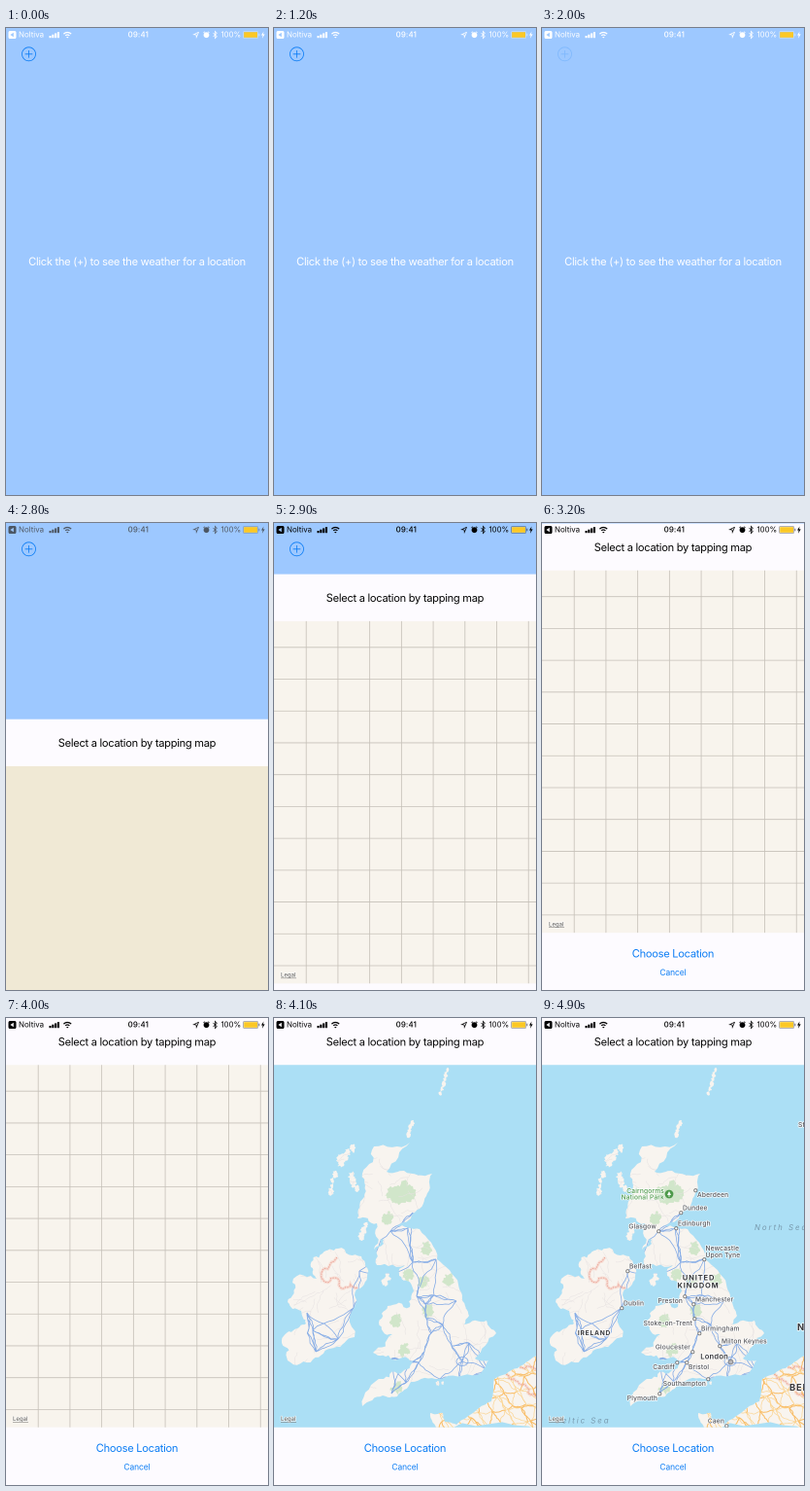
An HTML page with a canvas for the animation above (5 s loop, 270x480 px).

```html
<!DOCTYPE html>
<html lang="en">
<head>
<meta charset="utf-8">
<title>Weather location picker</title>
<style>
  html, body { margin: 0; width: 100%; height: 100%; overflow: hidden; background: #9dc8ff; }
  canvas { display: block; width: 270px; height: 480px; }
</style>
</head>
<body>
<canvas id="stage"></canvas>
<script>
const W = 270, H = 480, LOOP = 5000;
const MAP_TOP = 48.3, MAP_BOTTOM = 420.7;
const SKY = '#9dc8ff', PANEL = '#fdfbff', BLUE = '#0a7cf5';
const FONT = 'Inter, Roboto, sans-serif';
const scale = Math.max(2, window.devicePixelRatio || 1);

function makeLayer(canvas = document.createElement('canvas')) {
  canvas.width = W * scale;
  canvas.height = H * scale;
  const c = canvas.getContext('2d');
  c.scale(scale, scale);
  return c;
}

const ramp = (t, from, to) => Math.max(0, Math.min(1, (t - from) / (to - from)));

function random(seed) {
  seed = (seed * 48271 * 997) % 2147483647;
  return () => {
    seed = (seed * 16807) % 2147483647;
    return seed / 2147483647;
  };
}

function text(c, str, x, y, size, color, o = {}) {
  c.font = `${o.style || ''} ${o.weight || 400} ${size}px ${FONT}`;
  c.letterSpacing = (o.spacing || 0) + 'px';
  c.textAlign = o.align || 'center';
  c.textBaseline = 'middle';
  if (o.halo) {
    c.strokeStyle = o.halo;
    c.lineWidth = 1.6;
    c.lineJoin = 'round';
    c.strokeText(str, x, y);
  }
  c.fillStyle = color;
  c.fillText(str, x, y);
}

function disc(c, x, y, r, fill, stroke) {
  c.beginPath();
  c.arc(x, y, r, 0, 7);
  c.fillStyle = fill;
  c.fill();
  if (!stroke) return;
  c.strokeStyle = stroke;
  c.lineWidth = 0.8;
  c.stroke();
}

function points(flat) {
  const out = [];
  for (let i = 0; i < flat.length; i += 2) out.push([flat[i], flat[i + 1]]);
  return out;
}

function toPath(list) {
  const p = new Path2D();
  list.forEach(([x, y]) => p.lineTo(x, y));
  return p;
}

// Midpoint displacement: each pass bends every segment sideways.
function roughen(list, amount, seed, passes = 3) {
  const rnd = random(seed);
  for (let n = 0; n < passes; n++) {
    list = list.flatMap((a, i) => {
      const b = list[i + 1];
      if (!b) return [a];
      const k = (rnd() - 0.5) * amount;
      return [a, [(a[0] + b[0]) / 2 + (b[1] - a[1]) * k, (a[1] + b[1]) / 2 - (b[0] - a[0]) * k]];
    });
  }
  return list;
}

function blob(x, y, rx, ry, seed) {
  const ring = [];
  for (let i = 0; i <= 8; i++) {
    const a = i * Math.PI / 4;
    ring.push([x + rx * Math.cos(a), y + ry * Math.sin(a)]);
  }
  return toPath(roughen(ring, 0.9, seed));
}

// Key points of the coasts; the east is smooth, the west is ragged.
const east = points([
  103,132, 140,128, 116,158, 134,157, 163,160, 157,183, 143,201, 126,214, 150,217, 168,248, 190,274,
  197,296, 201,306, 196,315, 219,311, 229,324, 207,350, 221,352, 209,367, 170,371, 141,374, 127,389,
  112,388, 91,399
]);
const west = points([
  91,399, 113,371, 133,363, 148,352, 122,351, 102,344, 122,325, 108,313, 117,296, 140,297, 142,275,
  129,265, 138,251, 106,254, 113,232, 118,219, 103,238, 106,211, 86,206, 93,184, 91,160, 103,132
]);
const irish = points([
  66,237, 90,245, 96,266, 83,285, 83,328, 62,339, 40,351, 14,352, 8,334, 20,321, 33,314, 28,301,
  14,292, 19,272, 44,268, 38,256, 50,242, 66,237
]);
const channel = points([
  275,345, 251,360, 227,371, 224,394, 199,410, 188,418, 176,415, 174,406, 161,406, 168,425, 275,425
]);

// Chains of islets: start, end, how many, how large.
function islets(x0, y0, x1, y1, count, size, seed) {
  const rnd = random(seed), p = new Path2D();
  for (let i = 0; i < count; i++) {
    const k = (i + 0.5) / count, r = size * (0.6 + 0.6 * rnd());
    p.addPath(blob(x0 + (x1 - x0) * k + (rnd() - 0.5) * 2, y0 + (y1 - y0) * k, r, r * 1.4, seed + i));
  }
  return p;
}

const mainland = toPath(roughen(channel, 0.2, 19));
const ground = new Path2D();
[
  toPath([...roughen(east, 0.28, 8), ...roughen(west, 0.5, 15)]),
  toPath(roughen(irish, 0.5, 77)),
  mainland,
  islets(82, 132, 67, 149, 4, 4, 5),
  islets(63, 158, 57, 182, 4, 2.4, 9),
  islets(79, 161, 86, 178, 3, 4, 13),
  islets(97, 210, 88, 227, 3, 3.2, 17),
  islets(142, 106, 138, 122, 4, 2, 21),
  islets(179, 51, 171, 80, 6, 1.9, 25),
  islets(118, 264, 113, 274, 2, 2.6, 29),
  islets(167, 376, 176, 375, 2, 2, 33)
].forEach(p => ground.addPath(p));

// Labelled towns: place and the side on which the name stands.
const towns = [
  ['Aberdeen', 158, 177, 'SE'], ['Dundee', 143, 200, 'NE'], ['Glasgow', 120, 219, 'NW'],
  ['Edinburgh', 138, 216, 'NE'], ['Belfast', 88, 260, 'NE'], ['Dublin', 82, 298, 'NE'],
  ['Newcastle', 167, 248, ''], ['Preston', 147, 286, 'SW'], ['Manchester', 156, 294, 'NE'],
  ['Stoke-on-Trent', 157, 309, 'SW'], ['Birmingham', 162, 324, 'NE'], ['Milton Keynes', 183, 337, 'NE'],
  ['Gloucester', 155, 343, 'NW'], ['Cardiff', 139, 354, 'SW'], ['Bristol', 149, 354, 'SE'],
  ['Southampton', 171, 371, 'SW'], ['Plymouth', 121, 386, 'SW'], ['Caen', 190, 419, 'NW'],
  ['London', 194, 353, '']
];
// Further road junctions, without a name.
const junctions = points([
  143,251, 165,285, 188,291, 174,315, 201,334, 219,361, 191,369, 136,375, 121,350, 34,303, 40,321,
  43,343, 66,330
]);

function fractalLine(c, a, b, amount, seed) {
  c.stroke(toPath(roughen([a, b], amount, seed)));
}

function minorRoads(c) {
  const rnd = random(2024);
  c.strokeStyle = '#e6e1e1';
  c.lineWidth = 0.5;
  for (let i = 0; i < 190; i++) {
    const x = 15 + rnd() * 212, y = 140 + rnd() * 250, a = rnd() * 6.28, r = 12 + rnd() * 18;
    fractalLine(c, [x, y], [x + r * Math.cos(a), y + r * Math.sin(a)], 0.3, 5 + i);
  }
}

// Every junction is joined to its three nearest neighbours.
function motorways(c) {
  const hubs = [...towns.map(([, x, y]) => [x, y]).filter(([, y]) => y > 195), ...junctions];
  c.strokeStyle = '#80a9e6';
  c.lineWidth = 0.75;
  hubs.forEach((a, i) => {
    const gap = p => Math.hypot(p[0] - a[0], p[1] - a[1]);
    [...hubs].sort((p, q) => gap(p) - gap(q)).slice(1, 4)
      .forEach((b, j) => fractalLine(c, a, b, 0.25, 300 + i * 7 + j));
  });
  c.beginPath();
  c.ellipse(194, 353, 6, 4.5, 0, 0, 7);
  c.stroke();
}

// A jittered mesh of roads.
function continentRoads(c) {
  const step = 11;
  const node = (i, j) => {
    const rnd = random(71 + i * 31 + j * 7);
    return [164 + (i + rnd()) * step, 344 + (j + rnd()) * step];
  };
  for (let i = 0; i < 10; i++) for (let j = 0; j < 7; j++) {
    const major = (i + 2 * j) % 3 === 0;
    c.strokeStyle = major ? '#f9bd66' : '#fbd593';
    c.lineWidth = major ? 1 : 0.7;
    [[1, 0], [0, 1], [1, 1]].forEach(([di, dj], k) =>
      fractalLine(c, node(i, j), node(i + di, j + dj), 0.3, 9 + i * 8 + j + k));
  }
}

function border(c, flat) {
  const p = toPath(roughen(points(flat), 0.6, 33));
  c.strokeStyle = 'rgba(244,160,140,.28)';
  c.lineWidth = 3;
  c.stroke(p);
  c.strokeStyle = '#e9a093';
  c.lineWidth = 0.8;
  c.setLineDash([1.6, 1]);
  c.stroke(p);
  c.setLineDash([]);
}

function drawLand(c) {
  c.fillStyle = '#abdff5';
  c.fillRect(0, 0, W, H);
  c.fillStyle = '#f8f4ef';
  c.fill(ground);
  c.clip(ground);
  c.fillStyle = '#d1e6ca';
  const parks = [131,180, 117,206, 157,237, 139,264, 154,271, 180,269, 159,301, 126,311, 134,341, 127,380];
  points(parks).forEach(([x, y], i) =>
    c.fill(i ? blob(x, y, 5.5, 6.5, 50 + i) : blob(x, y, 15, 10, 50)));
  minorRoads(c);
  motorways(c);
  border(c, [65,246, 50,259, 51,270, 62,267, 72,278, 86,277]);
  c.clip(mainland);
  c.fill(mainland);
  c.fillStyle = '#f8f4ef';
  c.fill(mainland);
  continentRoads(c);
  border(c, [239,366, 255,377, 272,389]);
  border(c, [253,359, 275,359]);
}

function drawLabels(c) {
  const ink = '#55555a', dark = '#38383c', green = '#4e9a4b', halo = 'rgba(255,255,255,.85)';
  const label = (s, x, y, align, color = ink) =>
    text(c, s, x, y, 6.6, color, { weight: 500, align, halo, spacing: 0.18 });
  const sea = (s, x, y) => text(c, s, x, y, 7.8, '#7899ad', { style: 'italic', align: 'left', spacing: 2 });
  const country = (s, x, y, size, align) =>
    text(c, s, x, y, size, dark, { weight: 700, spacing: 0.8, halo, align });

  sea('North Sea', 219, 215.5);
  sea('Celtic Sea', 13, 414);
  towns.forEach(([name, x, y, side]) => {
    disc(c, x + 0.3, y + 0.3, 1.6, '#fff', '#707070');
    if (!side) return;
    const right = side[1] === 'E';
    label(name, x + (right ? 2 : -2), y + (side[0] === 'N' ? -4.3 : 4.8), right ? 'left' : 'right');
  });
  label('Newcastle', 168.5, 237, 'left');
  label('Upon Tyne', 168.5, 244, 'left');
  label('Stavanger', 264, 110, 'left');

  disc(c, 194.5, 353.5, 2.4, '#b5b5b8', '#77777a');
  text(c, 'London', 192, 348, 7.6, dark, { weight: 600, align: 'right', halo, spacing: 0.2 });

  label('Cairngorms', 126, 178, 'right', green);
  label('National Park', 126, 184.5, 'right', green);
  disc(c, 131, 181, 4.4, green);
  c.fillStyle = '#fff';
  c.fill(toPath([[131, 178], [133, 182], [129, 182]]));
  c.fillRect(130.6, 182, 0.8, 2);

  country('UNITED', 161.5, 267, 7.6);
  country('KINGDOM', 161, 275, 7.6);
  country('IRELAND', 54, 324, 6.6);
  country('BELGIUM', 255, 380, 9.4, 'left');
  country('NETHERLANDS', 263, 318, 9.4, 'left');
}

function layer(draw) {
  const c = makeLayer();
  c.beginPath();
  c.rect(0, MAP_TOP, W, MAP_BOTTOM - MAP_TOP);
  c.clip();
  draw(c);
  return c.canvas;
}

const landLayer = layer(drawLand);
const labelLayer = layer(drawLabels);
const ctx = makeLayer(document.getElementById('stage'));

function statusBar(c, color, alpha) {
  if (!alpha) return;
  c.save();
  c.globalAlpha = alpha;
  c.fillStyle = c.strokeStyle = color;
  const back = new Path2D();
  back.roundRect(2.5, 3, 8, 8, 1.8);
  back.addPath(toPath([[7.8, 4.8], [4.4, 7], [7.8, 9.2]]));
  c.fill(back, 'evenodd');
  for (let i = 0; i < 4; i++) c.fillRect(44.5 + i * 2.8, 8 - i * 1.3, 2.1, 2.2 + i * 1.3);

  c.lineWidth = 1.25;
  [2.8, 5.3].forEach(r => {
    c.beginPath();
    c.arc(63.3, 9.8, r, -Math.PI * 0.76, -Math.PI * 0.24);
    c.stroke();
  });
  c.fill(toPath([[63.3, 10.5], [62, 9], [64.6, 9]]));

  const small = { align: 'left' };
  text(c, 'Noltiva', 13, 7, 7.9, color, small);
  text(c, '09:41', 136.3, 7, 7.9, color, { weight: 500, spacing: 0.15 });
  text(c, '100%', 221.5, 7, 7.8, color, small);

  c.lineWidth = 0.7;
  const arrow = toPath([[198.6, 4.2], [193.4, 6.8], [196, 7], [196.2, 9.6], [198.6, 4.2]]);
  c.stroke(arrow);
  disc(c, 206.5, 7.2, 2.9, color);
  [-1, 1].forEach(s => c.stroke(toPath([[206.5 + s * 3.1, 5], [206.5 + s * 1.5, 3.7]])));
  c.stroke(toPath([[213.5, 5], [217.3, 8.8], [215.4, 10.7], [215.4, 3.3], [217.3, 5.2], [213.5, 9]]));
  c.fill(toPath([[265.5, 3.5], [263, 7.5], [264.6, 7.5], [264, 10.7], [266.7, 6.4], [265, 6.4]]));

  c.globalAlpha = alpha * 0.6;
  c.beginPath();
  c.roundRect(244.4, 3.4, 15.4, 7.2, 1.4);
  c.lineWidth = 0.5;
  c.stroke();
  c.fillRect(260.4, 5.7, 0.9, 2.6);
  c.restore();
}

function home(t) {
  ctx.fillStyle = SKY;
  ctx.fillRect(0, 0, W, H);
  ctx.save();
  ctx.globalAlpha = t >= 1995 && t < 2095 ? 0.2 : 1;
  ctx.strokeStyle = BLUE;
  ctx.lineWidth = 0.8;
  ctx.beginPath();
  ctx.arc(23.5, 26.8, 7, 0, 7);
  ctx.moveTo(19.7, 26.8);
  ctx.lineTo(27.3, 26.8);
  ctx.moveTo(23.5, 23);
  ctx.lineTo(23.5, 30.6);
  ctx.stroke();
  ctx.restore();
  text(ctx, 'Click the (+) to see the weather for a location', 135, 240.5, 11.08, '#fff', { spacing: -0.267 });
}

function grid() {
  const step = 32.72;
  ctx.strokeStyle = '#c6c1b9';
  ctx.lineWidth = 0.8;
  ctx.beginPath();
  for (let x = 33.2; x < W; x += step) {
    ctx.moveTo(x, MAP_TOP);
    ctx.lineTo(x, MAP_BOTTOM);
  }
  for (let y = 75.2; y < MAP_BOTTOM; y += step) {
    ctx.moveTo(0, y);
    ctx.lineTo(W, y);
  }
  ctx.stroke();
}

function picker(t, top) {
  ctx.save();
  ctx.translate(0, top);
  ctx.fillStyle = PANEL;
  ctx.fillRect(0, 0, W, H);
  const tiled = t >= 2890;
  ctx.fillStyle = tiled ? '#f8f4ed' : '#f0e9d5';
  ctx.fillRect(0, MAP_TOP, W, MAP_BOTTOM - MAP_TOP);
  if (t >= 4095) {
    ctx.drawImage(landLayer, 0, 0, W, H);
    ctx.globalAlpha = ramp(t, 4340, 4650);
    ctx.drawImage(labelLayer, 0, 0, W, H);
    ctx.globalAlpha = 1;
  } else if (tiled) {
    grid();
  }
  if (tiled) {
    text(ctx, 'Legal', 7, 412.2, 6, '#6e6c69', { align: 'left', weight: 500, halo: 'rgba(255,255,255,.7)' });
    ctx.fillRect(7, 415, 16, 0.5);
  }
  text(ctx, 'Select a location by tapping map', 135, 25, 11.08, '#000', { spacing: -0.267 });
  text(ctx, 'Choose Location', 135, 442.5, 11.08, BLUE, { spacing: -0.267 });
  text(ctx, 'Cancel', 135, 462.2, 8.4, BLUE, { spacing: -0.05 });
  ctx.restore();
}

// Critically damped spring: 1 at the start, 0 when settled.
function spring(ms) {
  const k = 18.26 * Math.max(0, ms) / 1000;
  return (1 + k) * Math.exp(-k);
}

const SLIDE = 2694.3;

function draw(t) {
  home(t);
  const top = H * spring(t - SLIDE);
  if (t > SLIDE) picker(t, top < 0.3 ? 0 : top);
  const dark = ramp(t, SLIDE, SLIDE + 175);
  statusBar(ctx, '#fff', 1 - dark);
  statusBar(ctx, '#000', dark);
  ctx.fillStyle = '#fcc825';
  ctx.fillRect(245.2, 4.2, 13.8, 5.6);
}

const start = performance.now();
function tick() {
  draw((performance.now() - start) % LOOP);
  requestAnimationFrame(tick);
}
tick();
</script>
</body>
</html>
```
